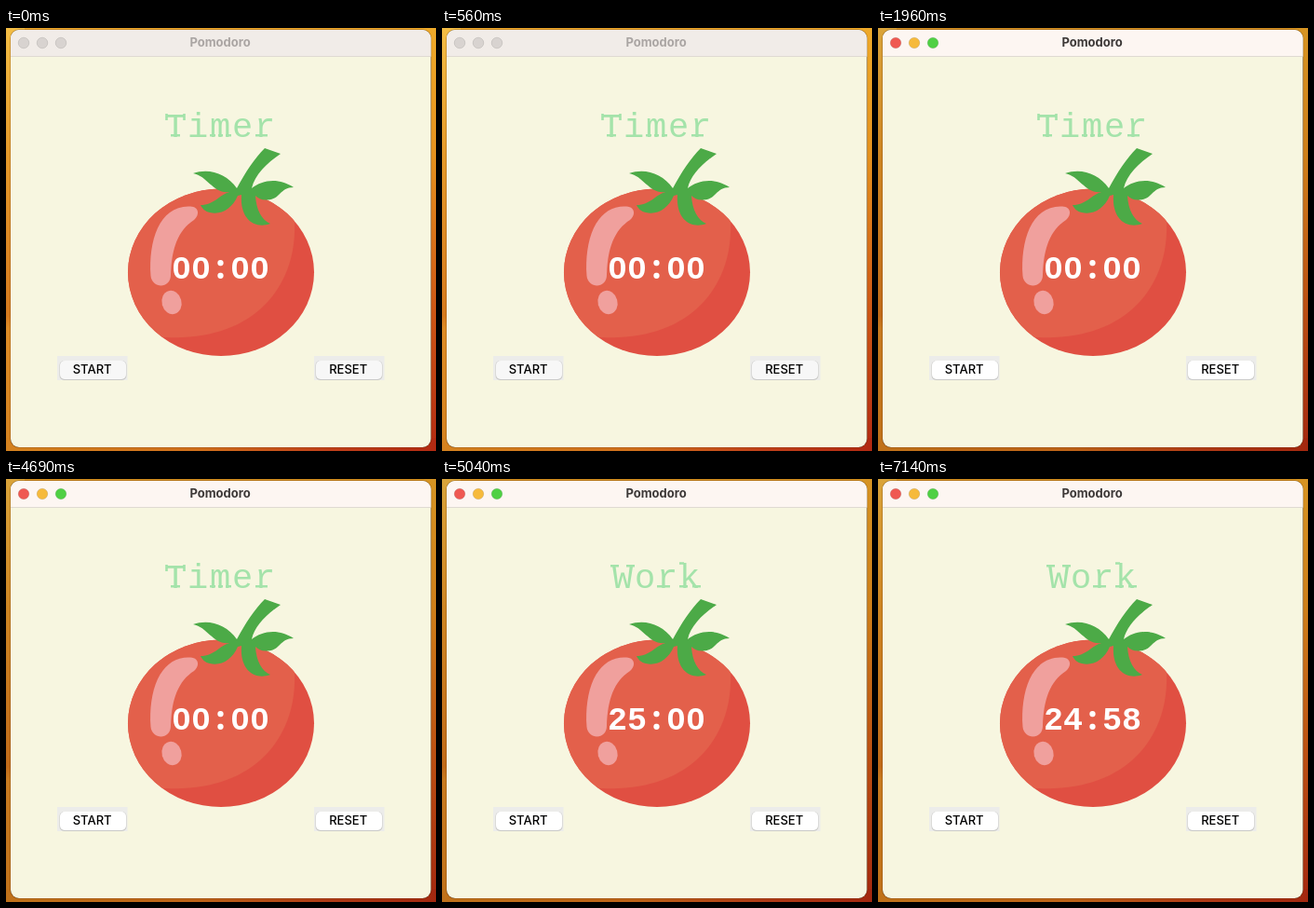
These frames come from a looping animation (462 by 454 pixels, 8000 ms). An HTML page:

```html
<!DOCTYPE html>
<html lang="en">
<head>
<meta charset="utf-8">
<title>Pomodoro</title>
<style>
  html, body { margin: 0; width: 100%; height: 100%; overflow: hidden; }
  svg { display: block; width: 462px; height: 454px; }
  text { text-anchor: middle; }
  .title { font: 700 13px Inter, sans-serif; fill: #3d3938; }
  .label { font: 37px "Liberation Mono", monospace; letter-spacing: 1.8px; fill: #a4e3aa; }
  .serifs { fill: none; stroke: #a4e3aa; stroke-width: 2.6; }
  .clock { font: 700 35px "Liberation Mono", monospace; fill: #fff; }
  .colon { font-family: "Noto Sans Mono", monospace; }
  .button text { font: 500 13px Inter, sans-serif; fill: #000; }
  .button .face { fill: #fff; }
  .bar { fill: #fdf6f2; }
  .light { stroke: #0002; stroke-width: .8; }
  .shade { fill: #5a2000; opacity: .16; }
  .inactive .title { fill: #aaa5a3; }
  .inactive .bar { fill: #f1ece8; }
  .inactive .light { fill: #d8d3d0; }
  .inactive .face { fill: #f7f7f7; }
  .inactive .shade { opacity: 0; }
</style>
</head>
<body>
<svg id="stage" viewBox="0 0 462 454" class="inactive">
  <defs>
    <linearGradient id="leftEdge" x2="0" y2="1">
      <stop stop-color="#f3bd45"/><stop offset=".3" stop-color="#e59a2a"/>
      <stop offset=".68" stop-color="#d57a1e"/><stop offset=".71" stop-color="#dd8c26"/>
      <stop offset="1" stop-color="#d4821f"/>
    </linearGradient>
    <linearGradient id="rightEdge" x2="0" y2="1">
      <stop stop-color="#eeaa2a"/><stop offset=".3" stop-color="#e5921f"/>
      <stop offset=".65" stop-color="#cf5a16"/><stop offset="1" stop-color="#b22a12"/>
    </linearGradient>
    <linearGradient id="bottomEdge">
      <stop stop-color="#d4821f"/><stop offset=".45" stop-color="#d0701c"/>
      <stop offset=".75" stop-color="#c0401a"/><stop offset="1" stop-color="#b22a12"/>
    </linearGradient>
    <rect id="frame" x="5" y="2" width="451.500" height="448" rx="9"/>
    <clipPath id="window"><use href="#frame"/></clipPath>
    <ellipse id="fruit" cx="231" cy="262.300" rx="100" ry="89.700"/>
    <clipPath id="fruitClip"><use href="#fruit"/></clipPath>
  </defs>

  <rect width="462" height="454" fill="#eca72c"/>
  <rect width="20" height="454" fill="url(#leftEdge)"/>
  <rect x="440" width="22" height="454" fill="url(#rightEdge)"/>
  <rect y="440" width="462" height="14" fill="url(#bottomEdge)"/>
  <rect class="shade" width="462" height="454"/>

  <use href="#frame" stroke="#5a2800" stroke-opacity=".3" stroke-width="1.500"/>
  <g clip-path="url(#window)">
    <rect width="462" height="454" fill="#f7f6e0"/>
    <rect class="bar" width="462" height="30"/>
    <rect y="30" width="462" height="1" fill="#dfdad2"/>
  </g>
  <circle class="light" cx="19" cy="16" r="5.800" fill="#ef5952"/>
  <circle class="light" cx="39" cy="16" r="5.800" fill="#f6ba3c"/>
  <circle class="light" cx="59" cy="16" r="5.800" fill="#4fd044"/>
  <text class="title" x="230" y="20">Pomodoro</text>

  <text class="label" id="label" x="230.900" y="116.500"></text>
  <path class="serifs" id="serifs"/>

  <use href="#fruit" fill="#e04f42"/>
  <path clip-path="url(#fruitClip)" fill="#e3604b" d="M310 160V208C313 278 266 336 173 332L100 330V160Z"/>
  <g fill="#f0a09d">
    <path d="M198 191.500C208 192 208 201 202 206C185 217 178 236 177 265C177 280 157 280 155.500 266C153 228 165 190 198 191.500Z"/>
    <ellipse cx="178" cy="294.500" rx="10.500" ry="12.800" transform="rotate(-15 178 294.500)"/>
  </g>
  <path fill="#4caa47" d="M278 129L295 135C280 145 267 158 264 172C275 163 293 160 309 171C294 171 295 184 281 184.500C275 185 271 183 268 180C269 196 275 206 284 210C268 216 251 206 253 179L249 180C243 194 231 201 219 198C214 197 211 194 209 190C224 190 229 179 240 176C222 178 217 159 201 156C218 150 237 156 248 172C257 155 267 140 278 129Z"/>

  <text class="clock" x="230.500" y="269"><tspan id="minutes"></tspan><tspan class="colon">:</tspan><tspan id="seconds"></tspan></text>
  <g id="zeroCenters" fill="#e3604b"></g>
  <g id="buttons"></g>
</svg>

<script>
const LOOP = 8000, ACTIVATE = 630, START = 4900, TICKS = [5950, 7000];
const $ = id => document.getElementById(id);

// Slab ends that turn the plain monospaced letters into typewriter ones
const SERIFS = {
  Timer: "M172.500 92v7M191.500 92v7M177 115.200h10M219 115.200h6M228 115.200h5M236 115.200h6M268 115.200h13",
  Work: "M181 93.300h9M198 93.300h9M231 115.200h14M255 115.200h9M269 115.200h9M255 90.500h5"
};

const button = (frameX, faceX, text) => `<g class="button">
  <rect x="${frameX}" y="352" width="75.500" height="26" fill="#ececea"/>
  <rect x="${faceX - .5}" y="357" width="72" height="21" rx="5" fill="#c9c9c7"/>
  <rect class="face" x="${faceX}" y="357" width="71" height="20" rx="5"/>
  <text x="${faceX + 34.7}" y="371.300">${text}</text></g>`;
$("buttons").innerHTML = button(55, 58, "START") + button(331, 333, "RESET");

function show(label, secondsLeft) {
  const pad = n => String(n).padStart(2, "0");
  const minutes = pad(Math.floor(secondsLeft / 60)), seconds = pad(secondsLeft % 60);
  $("label").textContent = label;
  $("serifs").setAttribute("d", SERIFS[label]);
  $("minutes").textContent = minutes;
  $("seconds").textContent = seconds;
  // Open the zeros, whose font puts a dot inside
  $("zeroCenters").innerHTML = [...`${minutes}:${seconds}`].map((digit, i) => digit === "0"
    ? `<ellipse cx="${188.5 + 21 * i}" cy="257.500" rx="3.400" ry="5.500"/>` : "").join("");
}

function draw() {
  const t = performance.now() % LOOP;
  $("stage").classList.toggle("inactive", t < ACTIVATE);
  if (t < START) show("Timer", 0);
  else show("Work", 25 * 60 - TICKS.filter(tick => t >= tick).length);
  requestAnimationFrame(draw);
}
draw();
</script>
</body>
</html>
```
